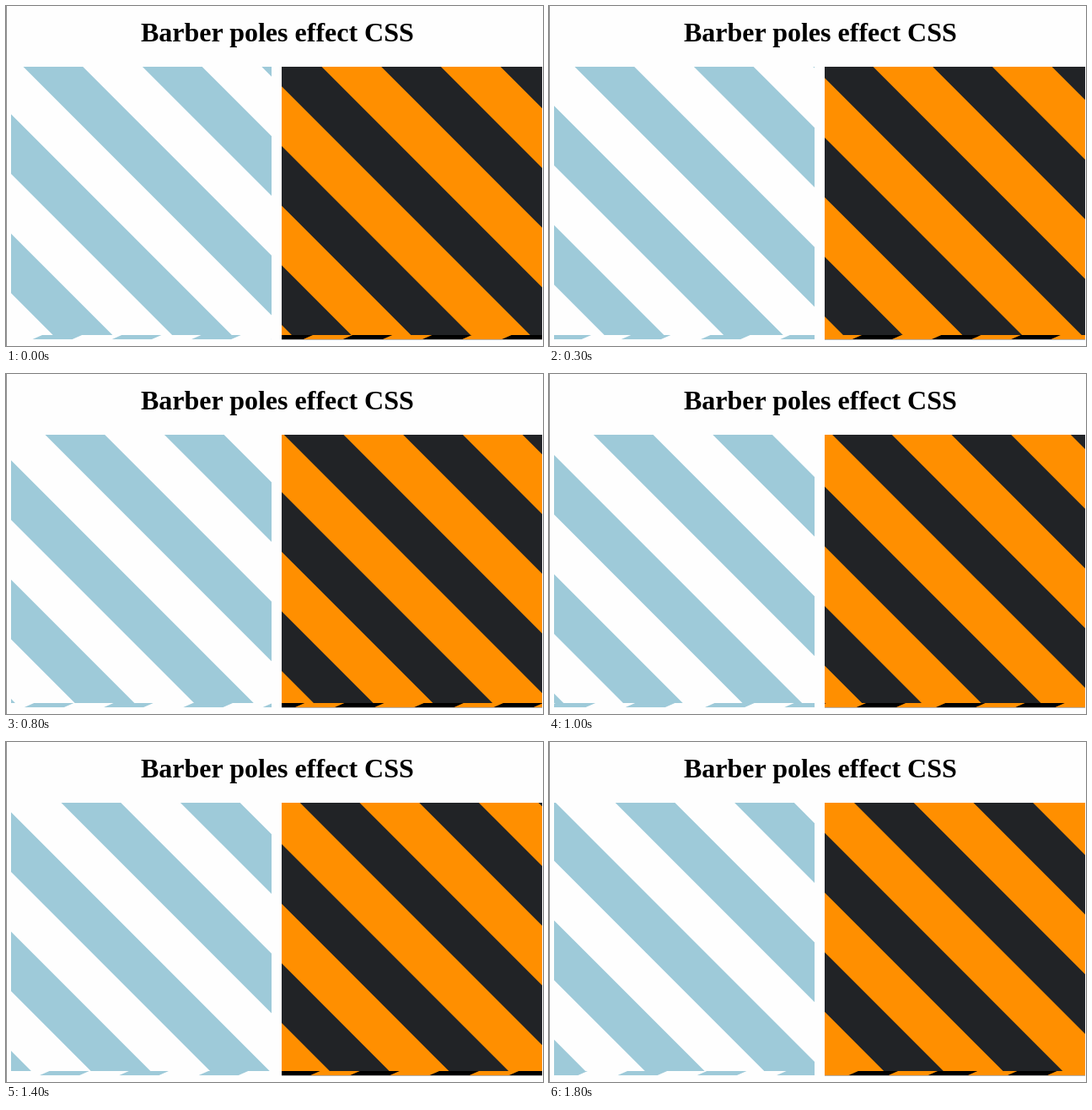
Animation of 637 by 403 pixels, one loop 1900 ms. Source, as an HTML page:

```html
<!DOCTYPE html>
<html lang="en">
<head>
<meta charset="utf-8">
<title>Barber poles effect CSS</title>
<style>
  html, body { margin: 0; width: 100%; height: 100%; overflow: hidden; background: #fefefe; }
  svg { display: block; }
  text { font: bold 32px "Liberation Serif", "Times New Roman", serif; }
</style>
</head>
<body>
<svg width="637" height="403" viewBox="0 0 637 403">
  <defs>
    <clipPath id="face"><rect width="309" height="318"/></clipPath>
    <clipPath id="edge"><rect y="318" width="309" height="5.3"/></clipPath>
  </defs>
  <rect width="637" height="403" fill="#fefefe"/>
  <rect width="1" height="403" fill="#8c8c8c"/>
  <text x="160" y="42">Barber poles effect CSS</text>
  <g transform="translate(6 72)">
    <path class="face" data-start="14.5" clip-path="url(#face)" fill="#9ecad9"/>
    <path class="edge" clip-path="url(#edge)" fill="#9ecad9"/>
  </g>
  <g transform="translate(327 72)">
    <rect width="309" height="318" fill="#212326"/>
    <rect y="318" width="309" height="5.3" fill="#000"/>
    <path class="face" data-start="47.5" clip-path="url(#face)" fill="#ff8f00"/>
    <path class="edge" clip-path="url(#edge)" fill="#ff8f00"/>
  </g>
</svg>
<script>
const LOOP = 1900, STEP = 100;
const PERIOD = 100 * Math.SQRT2;
const EDGE_PERIOD = PERIOD * 2 / 3;
// [step, horizontal travel in px]
const keys = [[0, 0], [3, 10], [5, 16.5], [8, 26], [11, 35.5], [14, 45], [18, 58.2]];

const faces = document.querySelectorAll('.face');
const edges = document.querySelectorAll('.edge');

function travel(step) {
  let i = 1;
  while (i < keys.length - 1 && step > keys[i][0]) i++;
  const [a, from] = keys[i - 1], [b, to] = keys[i];
  return from + (to - from) * (step - a) / (b - a);
}

// Slanted bands, each half a period wide, covering the panel
function bands(start, period, top, height, slant) {
  const margin = Math.abs(slant) + period;
  const first = ((start % period) + period) % period;
  let d = '';
  for (let x = first - Math.ceil(margin / period) * period; x < 309 + margin; x += period) {
    d += `M${x} ${top}h${period / 2}l${slant} ${height}h${-period / 2}z`;
  }
  return d;
}

function draw(ms) {
  const shift = travel(Math.floor(ms % LOOP / STEP));
  for (const f of faces) {
    f.setAttribute('d', bands(+f.dataset.start + shift, PERIOD, 0, 318, 318));
  }
  const d = bands(37 - shift * 4, EDGE_PERIOD, 318, 5.3, -12);
  for (const e of edges) e.setAttribute('d', d);
}

const begin = performance.now();
function tick() {
  draw(performance.now() - begin);
  requestAnimationFrame(tick);
}
tick();
</script>
</body>
</html>
```
